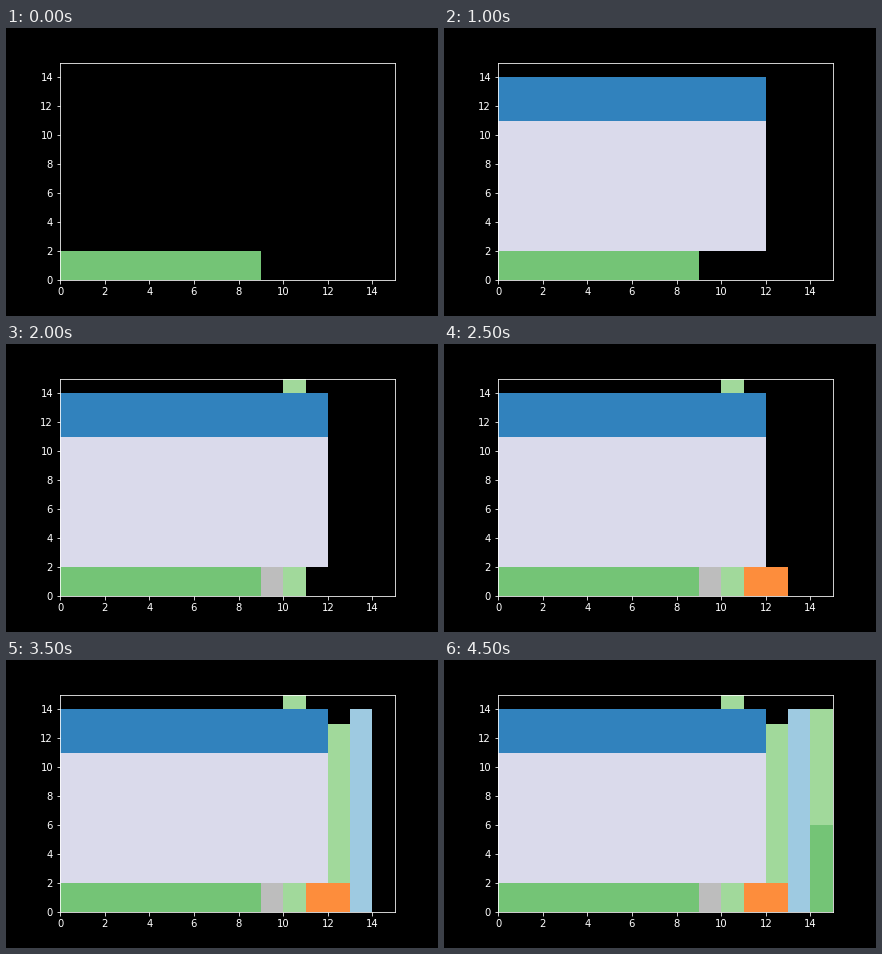
These frames come from a looping animation (432x288 px, 5000 ms). A matplotlib script:

```python
import matplotlib.pyplot as plt
from matplotlib.animation import FuncAnimation
from matplotlib.patches import Rectangle

plt.style.use("dark_background")

STEP_MS = 500
SIZE = 15
GREEN, MINT, SKY = "#74c476", "#a1d99b", "#9ecae1"
LAVENDER, BLUE = "#dadaeb", "#3182bd"
GREY, ORANGE = "#bdbdbd", "#fd8d3c"

# Each block: step it appears at, x, y, width, height, colour
BLOCKS = [
    (0, 0, 0, 9, 2, GREEN),
    (1, 0, 2, 12, 9, LAVENDER),
    (2, 0, 11, 12, 3, BLUE),
    (3, 9, 0, 1, 2, GREY),
    (4, 10, 0, 1, 2, MINT),
    (4, 10, 14, 1, 1, MINT),
    (5, 11, 0, 2, 2, ORANGE),
    (6, 12, 2, 1, 11, MINT),
    (7, 13, 0, 1, 14, SKY),
    (8, 14, 0, 1, 6, GREEN),
    (9, 14, 6, 1, 8, MINT),
]

fig, ax = plt.subplots(figsize=(6, 4), dpi=72)
fig.subplots_adjust(left=0.125, right=0.9, bottom=0.125, top=0.88)
ax.set_xlim(0, SIZE)
ax.set_ylim(0, SIZE)
ax.set_xticks(range(0, SIZE, 2))
ax.set_yticks(range(0, SIZE, 2))

patches = [
    ax.add_patch(Rectangle((x, y), w, h, facecolor=color, edgecolor="none", linewidth=0))
    for _, x, y, w, h, color in BLOCKS
]


def update(step):
    for patch, block in zip(patches, BLOCKS):
        patch.set_visible(block[0] <= step)
    return patches


def reset():
    return update(0)


anim = FuncAnimation(fig, update, frames=10, init_func=reset,
                     interval=STEP_MS, repeat=True, repeat_delay=0)
plt.show()
```
